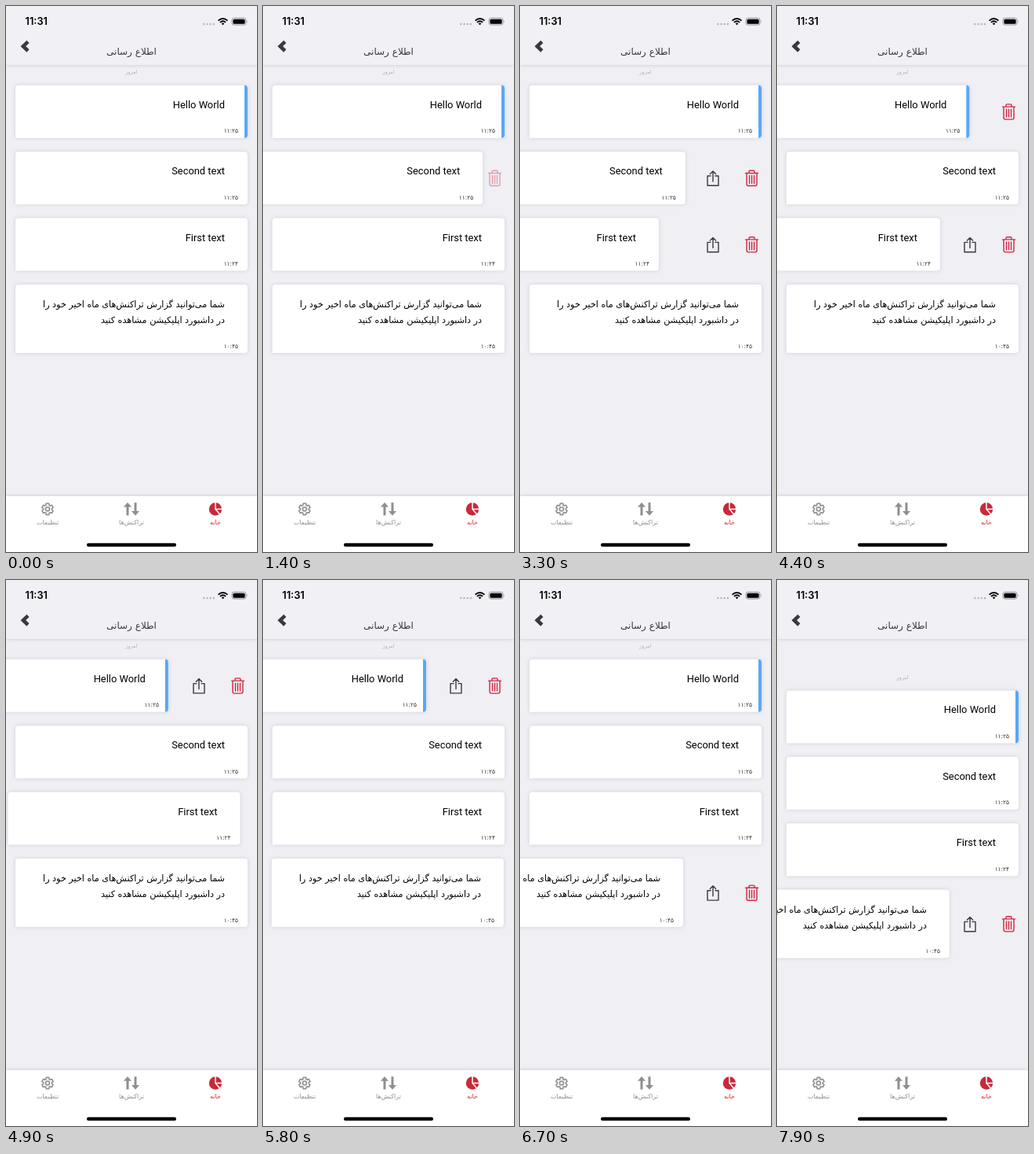
An HTML page for the animation above (8 s loop, 320 by 694 pixels).

```html
<!DOCTYPE html>
<html lang="fa">
<head>
<meta charset="utf-8">
<title>اطلاع رسانی</title>
<style>
  html, body { margin: 0; width: 100%; height: 100%; overflow: hidden; background: #efeff4; }
  svg { display: block; width: 100vw; height: 100vh; }
  text { font-family: "DejaVu Sans", sans-serif; }
  .latin { font: 12.9px Roboto, "DejaVu Sans", sans-serif; }
  .end { text-anchor: end; }
  .mid { text-anchor: middle; }
  .card { fill: #fff; filter: drop-shadow(0 0 2.5px rgba(40, 40, 60, .16)); }
  .line { fill: none; stroke-width: 1.4; stroke-linejoin: round; stroke-linecap: round; }
  .bar { filter: drop-shadow(0 0 2px rgba(40, 40, 60, .22)); }
</style>
</head>
<body>
<svg viewBox="0 0 320 694">
  <defs>
    <path id="trash" class="line" stroke="#d0263f"
      d="M-8 -6.5H8M-3.5 -6.5V-8.5Q-3.5 -9.7 -2.3 -9.7H2.3Q3.5 -9.7 3.5 -8.5V-6.5M-6.5 -6.5V7.2Q-6.5 9.5 -4.2 9.5H4.2Q6.5 9.5 6.5 7.2V-6.5M-3 -3.5V6.5M0 -3.5V6.5M3 -3.5V6.5"/>
    <path id="share" class="line" stroke="#3a3a3e"
      d="M-3 -3H-7V9.3H7V-3H3M0 4V-9M-3.6 -5.4L0 -9L3.6 -5.4"/>
  </defs>
  <rect width="320" height="694" fill="#efeff4"/>

  <g id="list">
    <text class="mid" x="160" y="86" font-size="6.6" fill="#b2b2b8">امروز</text>
  </g>

  <g id="header">
    <rect class="bar" y="-5" width="320" height="80" fill="#f0f0f5"/>
    <text x="24.5" y="24.3" style="font:600 12.8px Inter,sans-serif">11:31</text>
    <g id="dots" fill="#b4b4ba"></g>
    <g fill="none" stroke="#000" stroke-width="1.9">
      <path d="M270.6 18.6Q276.5 13.4 282.4 18.6"/>
      <path d="M272.9 20.9Q276.5 17.8 280.1 20.9"/>
    </g>
    <path d="M274.6 22.3Q276.5 20.8 278.4 22.3L276.5 24.3Z"/>
    <rect x="288" y="15.3" width="18" height="8.8" rx="2.6" fill="none" stroke="#8d8d92" stroke-width=".9"/>
    <rect x="289.4" y="16.7" width="15.2" height="6" rx="1.5"/>
    <path d="M307.2 18.2Q308.6 19.7 307.2 21.2Z" fill="#8d8d92"/>
    <path d="M28 45.3L21.9 51.2L28 57" fill="none" stroke="#343a40" stroke-width="4.6"/>
    <text class="mid" x="160" y="62" font-size="12" fill="#38383c">اطلاع رسانی</text>
  </g>

  <g id="tabs">
    <rect class="bar" y="623" width="320" height="76" fill="#fff"/>
    <g transform="translate(53 639.5)" fill="none" stroke="#8e8e93" stroke-width="1.6" stroke-linejoin="round">
      <path id="gear"/>
      <circle r="2.5"/>
    </g>
    <path d="M155 631L160 636.7H156.5V647.5H153.5V636.7H150ZM165 647.8L170 642H166.5V631.3H163.5V642H160Z" fill="#8e8e93"/>
    <circle cx="267" cy="639.5" r="8.2" fill="#c9293a"/>
    <path d="M267 630.5V639.5H276M267 639.5L273 646.5" fill="none" stroke="#fff" stroke-width="1.5"/>
    <g class="mid" font-size="8" fill="#8e8e93">
      <text x="53" y="659">تنظیمات</text>
      <text x="160" y="659">تراکنش&zwnj;ها</text>
      <text x="267" y="659" fill="#c9293a">خانه</text>
    </g>
    <rect x="103" y="682.8" width="114" height="4.4" rx="2.2"/>
  </g>
</svg>
<script>
const LOOP = 8000, STEP = 100, OPEN = 100;
const $ = id => document.getElementById(id);
const clamp = v => Math.max(0, Math.min(1, v));
const easeOut = p => 1 - (1 - clamp(p)) ** 3;

// Critically damped spring: 1 at release, settling to 0.
const spring = ms => {
  const u = Math.max(0, ms) * 0.0185;
  return (1 + u) * Math.exp(-u);
};

// Each swipe: drag from start to hold, let go at release, shut at close.
const cards = [
  { y: 100.8, h: 67, lines: ['Hello World'], time: '۱۱:۲۵', unread: true,
    swipe: { start: 4310, hold: 4686, release: 4686, peak: 112, close: 6110 } },
  { y: 185.2, h: 67, lines: ['Second text'], time: '۱۱:۲۵',
    swipe: { start: 1370, hold: 1700, release: 1886, peak: 112, close: 3286 } },
  { y: 269.6, h: 67, lines: ['First text'], time: '۱۱:۲۴',
    swipe: { start: 2960, hold: 3286, release: 3286, peak: 132, close: 4686 } },
  { y: 354, h: 87, time: '۱۰:۴۵', persian: true,
    lines: ['شما می&zwnj;توانید گزارش تراکنش&zwnj;های ماه اخیر خود را', 'در داشبورد اپلیکیشن مشاهده کنید'],
    swipe: { start: 5799, hold: 6110, release: 6110, peak: 112, close: 7868 } }
];

function cardMarkup({ y, h, lines, time, unread, persian }) {
  const mid = h / 2 + 0.3;
  const font = persian ? 'font-size="11.2"' : 'class="latin"';
  const body = lines.map((s, i) => `<text ${font} x="279" y="${29 + i * 20}">${s}</text>`).join('');
  const stripe = unread
    ? `<path d="M304 0Q308 0 308 4V${h - 4}Q308 ${h} 304 ${h}Z" fill="#58a8f4"/>` : '';
  return `<g transform="translate(0 ${y})">
    <use href="#share" x="246" y="${mid}"/>
    <use href="#trash" x="295.5" y="${mid}"/>
    <g class="end">
      <path class="card" d="M16 0H304Q308 0 308 4V${h - 4}Q308 ${h} 304 ${h}H12V4Q12 0 16 0Z"/>
      ${stripe}${body}
      <text x="296" y="${h - 6.3}" font-size="7.4" fill="#333">${time}</text>
    </g>
  </g>`;
}

function gearPath() {
  const pts = [];
  for (let i = 0; i < 6; i++) {
    for (const [turn, r] of [[-0.4, 5.4], [-0.24, 7.4], [0.24, 7.4], [0.4, 5.4]]) {
      const a = i * Math.PI / 3 + turn - Math.PI / 2;
      pts.push((r * Math.cos(a)).toFixed(2) + ' ' + (r * Math.sin(a)).toFixed(2));
    }
  }
  return 'M' + pts.join('L') + 'Z';
}

function offset(t, { start, hold, release, peak, close }) {
  if (t < start) return 0;
  if (t < release) return peak * easeOut((t - start) / (hold - start));
  if (t < close) return OPEN + (peak - OPEN) * spring(t - release);
  return OPEN * spring(t - close);
}

$('gear').setAttribute('d', gearPath());
$('dots').innerHTML = [0, 1, 2, 3].map(i => `<circle cx="${252.3 + i * 4.2}" cy="23" r="1.2"/>`).join('');
for (const card of cards) {
  $('list').insertAdjacentHTML('beforeend', cardMarkup(card));
  [card.share, card.trash, card.front] = $('list').lastElementChild.children;
}

function draw(ms) {
  const t = Math.floor(ms % LOOP / STEP) * STEP;
  for (const { swipe, share, trash, front } of cards) {
    const x = offset(t, swipe);
    front.setAttribute('transform', `translate(${-x.toFixed(2)} 0)`);
    trash.setAttribute('opacity', clamp((x - 12) / 40));
    share.setAttribute('opacity', clamp((x - 65) / 18));
  }
  const pull = 39.6 * clamp((t - 7750) / 150);
  $('list').setAttribute('transform', `translate(0 ${pull})`);
}

const begin = performance.now();
function tick() {
  draw(performance.now() - begin);
  requestAnimationFrame(tick);
}
tick();
</script>
</body>
</html>
```
